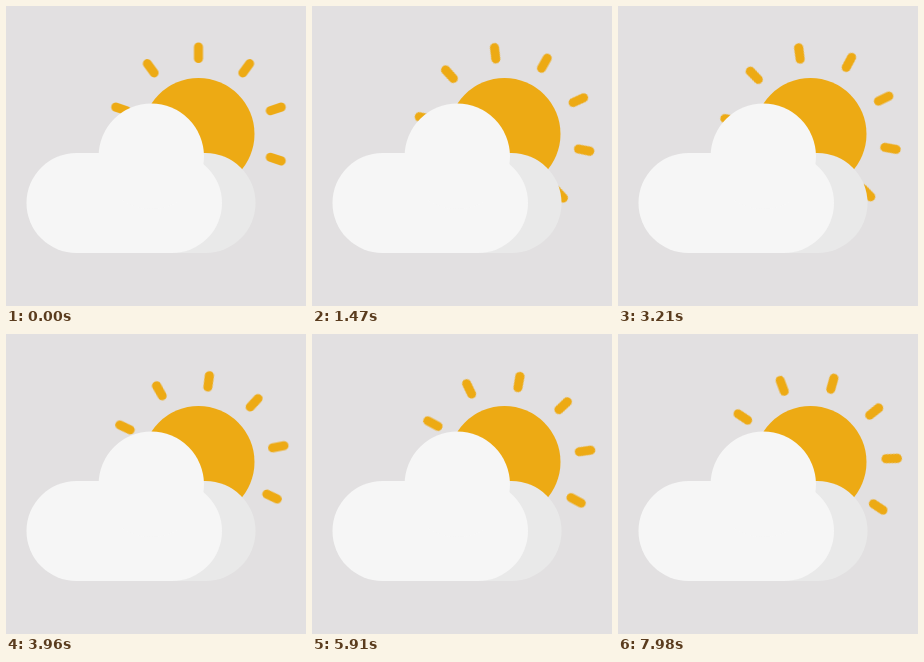
An HTML page without scripts that plays this animation: 300x300 px, repeating every 8000 ms.

```html
<!DOCTYPE html>
<html lang="en">
<head>
<meta charset="utf-8">
<title>Sun behind a cloud</title>
<style>
  html, body { margin: 0; height: 100%; overflow: hidden; background: #e2e0e1; }
  svg { display: block; width: 100%; height: 100%; }
  .sun { fill: #edaa14; stroke: none; }
  .rays {
    stroke: #edaa14;
    stroke-width: 9;
    stroke-linecap: round;
    animation: turn 8s infinite;
  }
  .back { fill: #e9e9e9; }
  .front { fill: #f6f6f6; }

  /* 0.6deg every 30ms, then a hard restart */
  @keyframes turn {
    0% { transform: rotate(0deg); animation-timing-function: steps(266, end); }
    99.75%, 100% { transform: rotate(159.6deg); }
  }
</style>
</head>
<body>
<svg viewBox="0 0 300 300">
  <defs>
    <path id="ray" d="M0-75.5V-87"/>
    <g id="pair">
      <use href="#ray"/>
      <use href="#ray" transform="rotate(180)"/>
    </g>
  </defs>

  <g transform="translate(192.5 128)">
    <circle class="sun" r="56"/>
    <g class="rays">
      <use href="#pair"/>
      <use href="#pair" transform="rotate(36)"/>
      <use href="#pair" transform="rotate(72)"/>
      <use href="#pair" transform="rotate(108)"/>
      <use href="#pair" transform="rotate(144)"/>
    </g>
  </g>

  <rect class="back" x="120" y="147" width="129.5" height="100" rx="50"/>
  <g class="front">
    <rect x="20.5" y="147" width="195.5" height="100" rx="50"/>
    <circle cx="145.3" cy="150.3" r="52.7"/>
  </g>
</svg>
</body>
</html>
```
